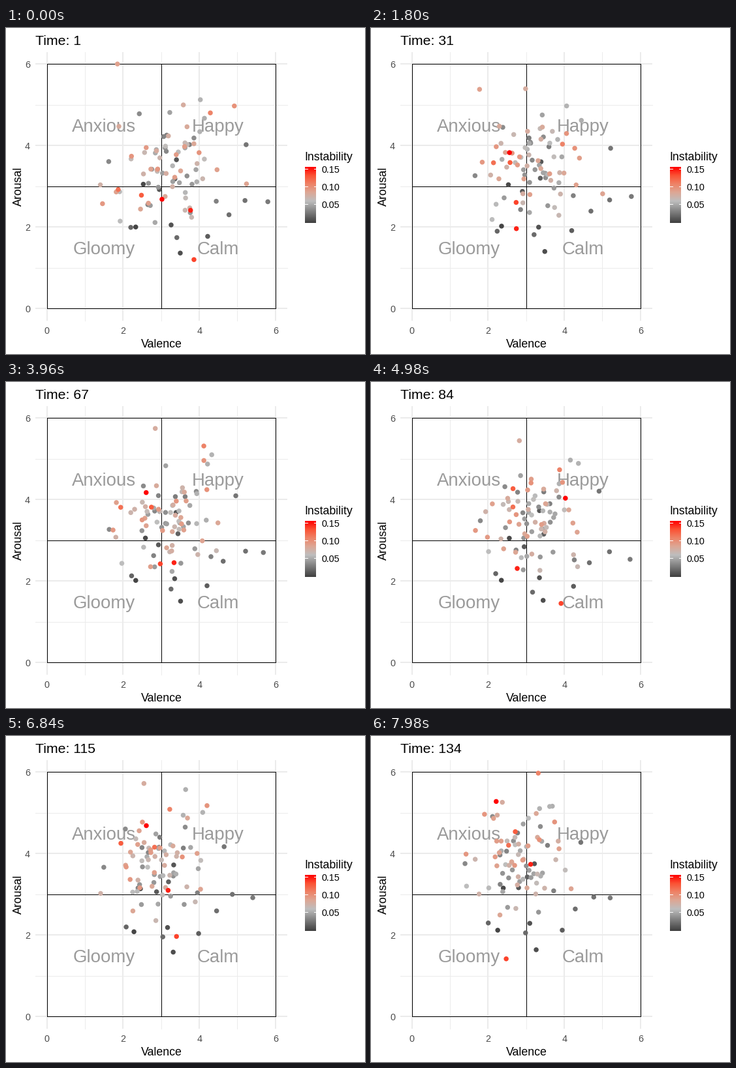
Write a matplotlib script that moves like this. It is 550 px wide and 500 px high and loops after 8000 ms.

```python
import numpy as np
import matplotlib.pyplot as plt
from matplotlib.animation import FuncAnimation
from matplotlib.colors import LinearSegmentedColormap

plt.rcParams["font.family"] = "Liberation Sans"

W, H, DPI = 550, 500, 100
STEPS = 134            # time steps, 60 ms each
TICK = 20              # ms per drawn frame
FRAMES = 400
PT = 72 / DPI          # points per pixel
LEFT, RIGHT, TOP, BOTTOM = 62.8, 412.8, 55.2, 430.2
MAX_INST = 0.157
CENTRE = np.array([3.15, 3.5])

rng = np.random.default_rng(12)


def px(x):
    return LEFT + (RIGHT - LEFT) / 6 * x


def py(y):
    return BOTTOM - (BOTTOM - TOP) / 6 * y


# ---------- motion ----------

def walk(start, inst):
    """Random walks whose step grows with instability, pulled towards home.

    Home lies near the start for steady people, near the centre for others.
    A shared drift to the upper left sets in late.
    """
    size = inst[:, None]
    home = start + 0.7 * size / MAX_INST * (CENTRE - start)
    drift = np.array([-0.4, 0.3]) * (1 - np.exp(-size / 0.01))
    pos, vel = start, rng.normal(size=start.shape)
    out = np.empty((STEPS,) + start.shape)
    for k in range(STEPS):
        s = np.clip((k - 83) / 50, 0, 1)
        out[k] = pos + drift * s * s * (3 - 2 * s)
        vel = 0.6 * vel + 0.8 * rng.normal(size=start.shape)
        pos = np.clip(pos + 0.55 * size * vel + 0.02 * (home - pos), 0, 6)
    return np.clip(out, 0, 6)


# the steadiest people, darkest first, and the most volatile, reddest last
steady = np.array([
    (2.33, 2.0), (2.53, 3.05), (3.5, 1.36), (3.26, 2.05), (3.4, 3.65),
    (2.95, 2.92), (4.22, 1.77), (3.36, 3.18), (2.2, 1.99), (3.41, 1.74),
    (4.78, 2.3), (5.2, 2.65), (5.23, 4.02), (5.8, 2.62)])
volatile = np.array([
    (1.85, 6.0), (4.92, 4.97), (4.29, 4.8), (1.87, 2.92), (2.48, 2.78),
    (3.86, 1.2), (3.77, 2.41), (3.02, 2.68)])
crowd = rng.normal(CENTRE, (0.8, 0.72), (76, 2))

start = np.concatenate([steady, crowd, volatile])
inst = np.concatenate([
    np.linspace(0.003, 0.028, len(steady)),
    np.linspace(0.03, 0.098, len(crowd)),
    np.linspace(0.09, MAX_INST, len(volatile))])
path = walk(start, inst)
path = np.stack([px(path[..., 0]), py(path[..., 1])], axis=-1)

# ---------- stage ----------

cmap = LinearSegmentedColormap.from_list("inst", [
    (0, "#404040"), (0.39, "#bebebe"), (0.55, "#dda694"),
    (0.7, "#ee8266"), (0.85, "#fb5335"), (1, "#ff0000")])

fig = plt.figure(figsize=(W / DPI, H / DPI), dpi=DPI, facecolor="white")
ax = fig.add_axes([0, 0, 1, 1])


def label(x, y, s, size, color="black", ha="left", **kw):
    return ax.text(x, y, s, fontsize=size * PT, color=color, ha=ha,
                   va="baseline", **kw)


def seg(xs, ys, color, width, z):
    ax.plot(xs, ys, color=color, lw=width * PT, zorder=z, antialiased=False,
            solid_capstyle="butt")


for v in range(7):
    width = 1 if v % 2 else 2
    seg([px(v)] * 2, [37, 449], "#ebebeb", width, 1)
    seg([45, 431], [py(v)] * 2, "#ebebeb", width, 1)
    if v % 2 == 0:
        label(px(v), 469, str(v), 14.4, "#4d4d4d", "center")
        label(37, py(v) + 5.5, str(v), 14.4, "#4d4d4d", "right")

seg([LEFT, RIGHT, RIGHT, LEFT, LEFT], [TOP, TOP, BOTTOM, BOTTOM, TOP],
    "black", 1, 2)
seg([px(3)] * 2, [TOP, BOTTOM], "black", 1, 2)
seg([LEFT, RIGHT], [py(3)] * 2, "black", 1, 2)

for x, y, word in [(1.5, 4.5, "Anxious"), (4.5, 4.5, "Happy"),
                   (1.5, 1.5, "Gloomy"), (4.5, 1.5, "Calm")]:
    label(px(x) - 0.5, py(y) + 10.5, word, 27.6, "#9b9b9b", "center", zorder=3)

label(238, 489.5, "Valence", 17.8, ha="center")
label(23.5, 243, "Arousal", 17.8, ha="center", rotation=90,
      rotation_mode="anchor")
title = label(45, 26, "", 21.3)

label(457.5, 203, "Instability", 17.8)
ax.imshow(np.linspace(1, 0, 86)[:, None], cmap=cmap, vmin=0, vmax=1,
          extent=(458, 475, 299, 213), aspect="auto", zorder=2)
for value, y in [("0.15", 216), ("0.10", 243), ("0.05", 270)]:
    seg([458, 461.5], [y, y], "white", 1, 3)
    seg([471.5, 475], [y, y], "white", 1, 3)
    label(484, y + 6, value, 14.4)

dots = ax.scatter(path[0, :, 0], path[0, :, 1], s=(7.5 * PT) ** 2, c=inst,
                  cmap=cmap, vmin=0, vmax=MAX_INST, linewidths=0, zorder=4)
ax.set_xlim(0, W)
ax.set_ylim(H, 0)
ax.axis("off")


def update(frame):
    k = frame * TICK // 60
    dots.set_offsets(path[k])
    title.set_text(f"Time: {k + 1}")
    return dots, title


anim = FuncAnimation(fig, update, frames=FRAMES, interval=TICK, repeat=True,
                     repeat_delay=0, blit=False)
plt.show()
```
